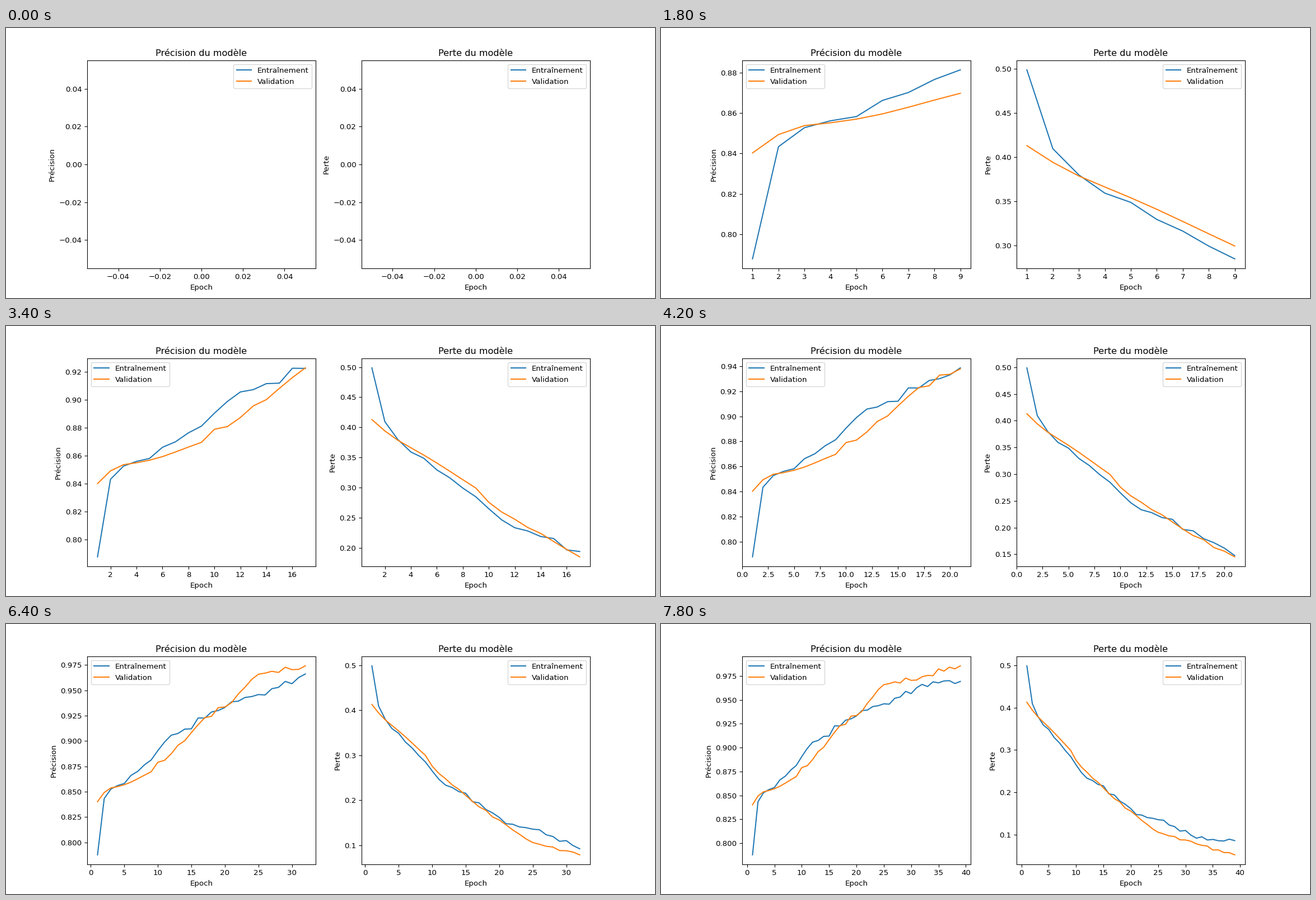
Animation of 1159x483 px, one loop 8 s. Source, as a matplotlib script:

```python
import numpy as np
import matplotlib.pyplot as plt
from matplotlib.animation import FuncAnimation

W, H = 1159, 483
DPI = W / 12
EPOCHS = 39
STEP_MS = 200

rng = np.random.default_rng(4)
epochs = np.arange(1, EPOCHS + 1)

# Each curve runs through its values at these epochs.
KEYS = np.array([1, 2, 4, 9, 11, 17, 21, 25, 32, 39])
TRAIN_ACC = [.7878, .8433, .8561, .8813, .8990, .9226, .9387, .9458, .9661, .9692]
VAL_ACC = [.8402, .8493, .8551, .8697, .8810, .9230, .9379, .9658, .9741, .9855]
TRAIN_LOSS = [.4988, .4095, .3592, .2848, .2464, .1940, .1477, .1355, .0919, .0861]
VAL_LOSS = [.4130, .3941, .3662, .2994, .2594, .1851, .1453, .1058, .0784, .0525]


def wobble(size):
    """Random scatter between the key epochs."""
    noise = rng.normal(0, size, EPOCHS)
    noise[KEYS - 1] = 0
    return noise


def curve(values, noise):
    return np.interp(epochs, KEYS, values) + noise


# A better epoch has higher accuracy and lower loss.
train_noise, val_noise = wobble(0.0018), wobble(0.0018)
accuracy = curve(TRAIN_ACC, train_noise), curve(VAL_ACC, val_noise)
loss = curve(TRAIN_LOSS, -1.5 * train_noise), curve(VAL_LOSS, -val_noise)

# The tiny margin keeps the pixel size from rounding down.
fig, (acc_ax, loss_ax) = plt.subplots(
    1, 2, figsize=((W + 1e-6) / DPI, (H + 1e-6) / DPI), dpi=DPI)


def draw_panel(ax, n, name, curves):
    ax.clear()
    for values, label in zip(curves, ("Entraînement", "Validation")):
        ax.plot(epochs[:n], values[:n], label=label)
    ax.set_title(f"{name} du modèle")
    ax.set_xlabel("Epoch")
    ax.set_ylabel(name)
    ax.legend(loc="best")


def update(n):
    draw_panel(acc_ax, n, "Précision", accuracy)
    draw_panel(loss_ax, n, "Perte", loss)
    return []


def reset():
    return update(0)


anim = FuncAnimation(fig, update, frames=EPOCHS + 1, init_func=reset,
                     interval=STEP_MS, repeat=True, repeat_delay=0)

plt.show()
```
